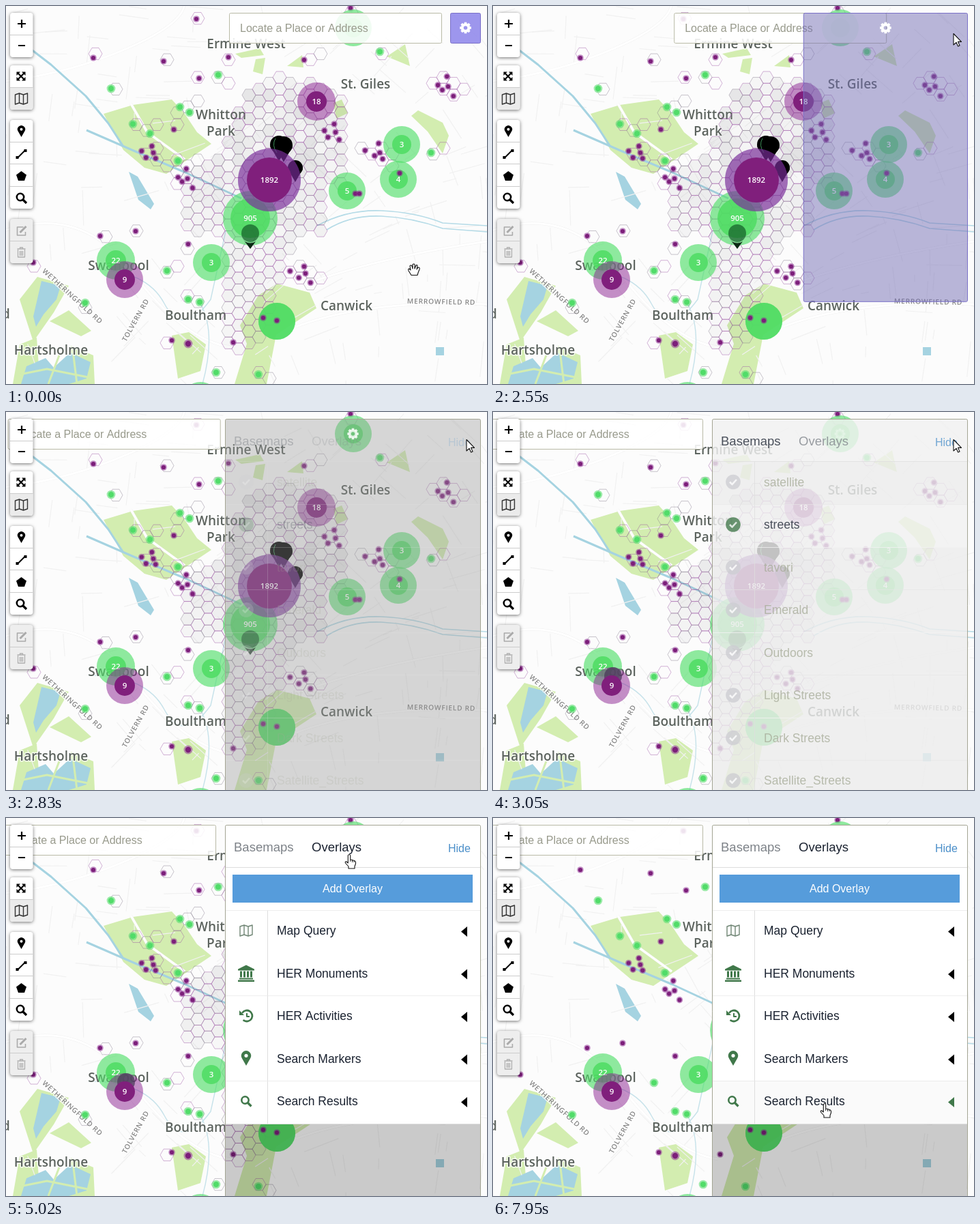
Animation of 705x554 px, one loop 8 s. Source, as an HTML page with a canvas:

```html
<!DOCTYPE html>
<html lang="en">
<head>
<meta charset="utf-8">
<title>Map overlays panel</title>
<style>
html, body { margin: 0; width: 100%; height: 100%; overflow: hidden; background: #fcfcfc; }
canvas { display: block; }
</style>
</head>
<body>
<canvas id="stage" width="705" height="554"></canvas>
<script>
const W = 705, H = 554, LOOP = 8000, TAU = Math.PI * 2;
const stage = document.getElementById('stage').getContext('2d');
const SANS = '"Liberation Sans", Arial, sans-serif';
const MAP = '"Open Sans", "Noto Sans", sans-serif';
const GREEN = '#40784a', INK = '#1a2230';
let g = stage;

const clamp = v => Math.max(0, Math.min(1, v));
const span = (t, a, b) => clamp((t - a) / (b - a));
const smooth = u => u * u * (3 - 2 * u);
const mix = (a, b, u) => a + (b - a) * u;

function layer(draw) {
  const c = document.createElement('canvas');
  c.width = W; c.height = H;
  g = c.getContext('2d');
  draw();
  g = stage;
  return c;
}
function fill(d, color) { g.fillStyle = color; g.fill(new Path2D(d)); }
function line(d, color, w = 1) {
  g.strokeStyle = color; g.lineWidth = w; g.lineJoin = 'round';
  g.stroke(new Path2D(d));
}
function disc(x, y, r, color) {
  g.fillStyle = color; g.beginPath(); g.arc(x, y, r, 0, TAU); g.fill();
}
function rect(x, y, w, h, color) { g.fillStyle = color; g.fillRect(x, y, w, h); }
function text(s, x, y, font, color, align = 'left') {
  g.font = font; g.fillStyle = color; g.textAlign = align;
  g.fillText(s, x, y);
}
function at(x, y, draw, angle = 0) {
  g.save(); g.translate(x, y); g.rotate(angle); draw(); g.restore();
}
function random(seed) {
  return () => (seed = (seed * 16807) % 2147483647) / 2147483647;
}

// ---- base map ----
function label(s, x, y, font, color, angle = 0) {
  at(x, y, () => {
    g.font = font; g.textAlign = 'center'; g.lineJoin = 'round';
    g.strokeStyle = 'rgba(255,255,255,.8)'; g.lineWidth = 3;
    g.strokeText(s, 0, 0);
    text(s, 0, 0, font, color, 'center');
  }, angle);
}
const place = (s, x, y) => label(s, x, y, '600 19px ' + MAP, '#5d645f');
function road(s, x, y, angle) {
  g.letterSpacing = '.7px';
  label(s, x, y, '600 10.3px ' + MAP, '#858585', angle);
  g.letterSpacing = '0px';
}
const base = layer(() => {
  rect(0, 0, W, H, '#fcfcfc');
  const park = '#d3edb0', water = '#a5d3e1';
  fill('M143 158 186 145 243 137 262 158 280 185 301 202 235 246 203 237 172 211Z', park);
  fill('M336 70 372 62 378 72 345 76ZM366 78 380 76 376 100 362 96ZM412 88 434 72 436 90ZM558 74 585 56 592 88Z', park);
  fill('M594 161 604 153 640 171 649 190 640 216 618 184ZM480 142 492 137 501 157 484 165Z', park);
  fill('M370 424 397 407 445 420 455 443 396 482 382 554 335 554 353 495 343 468Z', park);
  fill('M20 430 46 397 92 410 70 449 40 492ZM64 462 92 446 125 476 110 484ZM20 496 45 486 50 554 10 554ZM95 498 128 512 130 554 88 554Z', park);
  fill('M243 483 268 478 293 496 285 535 252 546Z', park);
  fill('M52 403 80 410 74 430 55 452 44 470 40 455ZM30 528 58 516 70 530 94 508 124 522 118 546 92 554 22 554Z', water);
  fill('M180 243 193 250 217 290 212 298 194 284ZM630 500H642V512H630Z', water);
  line('M20 540 60 532 125 545M78 512 62 554M98 505 104 554', park, 3);

  const rnd = random(71);
  g.strokeStyle = '#f1f1f1'; g.lineWidth = 1.2;
  for (let i = 0; i < 200; i++) {
    const x = rnd() * W, y = rnd() * H, len = 10 + rnd() * 45;
    const a = -.35 + Math.sin(x / 130 + y / 170) * .5 + (rnd() > .5 ? Math.PI / 2 : 0);
    g.beginPath(); g.moveTo(x, y);
    g.lineTo(x + len * Math.cos(a), y + len * Math.sin(a)); g.stroke();
  }
  const main = 'M0 110Q95 98 178 62T262 -5M183 143 207 185 262 225M-5 330Q110 290 185 390T330 500M455 402Q560 366 705 345M425 470Q530 430 705 437';
  line(main, '#f0f0f0', 4);
  line(main, '#ffffff', 3);
  line('M8 44 40 66 66 86 117 132 150 172 172 206', water, 3);
  line('M118 182 187 212 263 244 345 282', water, 3);
  line('M456 322Q500 298 550 300T640 318L705 322M470 328Q505 306 550 308T640 326L705 331', '#b5dbe7', 1.6);
  line('M120 386Q205 385 232 436T300 430L322 330M286 438Q308 480 288 554', '#c6e2ea', 1.4);

  place('Ermine West', 352, 62);
  place('Whitton', 315, 166);
  place('Park', 315, 190);
  place('St. Giles', 527, 121);
  place('Swanpool', 165, 387);
  place('Boultham', 278, 460);
  place('Canwick', 499, 446);
  place('Hartsholme', 66, 511);
  place('d', 0, 458);
  road('WETHERINGFOLD RD', 95, 428, .735);
  road('TOLVERN RD', 193, 462, -1.06);
  road('MERROWFIELD RD', 638, 437, .02);
});

// ---- hexagons and points ----
const pairs = (...v) => v.flatMap((x, i) => i % 2 ? [] : [[x, v[i + 1]]]);
const greens = pairs(154,121, 255,148, 269,156, 186,173, 211,187, 252,227, 311,101, 236,388, 116,435,
  267,430, 284,434, 308,537, 370,540, 548,67, 623,215);
const purples = pairs(279,19, 128,76, 231,81, 283,106, 326,75, 437,79, 246,181, 190,330, 138,337,
  267,349, 40,376, 243,490, 333,493, 505,3);
const clumps = pairs(213,215, 263,253, 480,185, 436,392, 645,118, 545,215);
const spread = random(44);
for (const [x, y] of clumps)
  for (let k = 0; k < 5; k++) {
    const a = k * 2.4, r = 3 + 11 * Math.sqrt(k / 4) * (.6 + spread());
    purples.push([x + r * Math.cos(a), y + r * Math.sin(a)]);
  }

const COL = 15, ROW = 17.3;
function centre(c, r) { return [131 + COL * c, 70 + ROW * (r + (c & 1) / 2)]; }
function cellAt([x, y]) {
  const near = [-1, 0, 1].map(d => {
    const c = Math.round((x - 131) / COL) + d, r = Math.round((y - 70) / ROW - (c & 1) / 2);
    const [cx, cy] = centre(c, r);
    return { cell: [c, r], gap: Math.hypot(cx - x, cy - y) };
  });
  return near.sort((a, b) => a.gap - b.gap)[0].cell;
}
const hexes = layer(() => {
  const town = new Path2D('M401 96 350 128 334 165 318 220 258 248V328L320 335V500L348 512 378 492 395 425 408 380 440 332 470 330 475 262 498 260V140L446 112Z');
  const cells = new Map(), rnd = random(929);
  for (let c = 8; c < 26; c++)
    for (let r = 0; r < 28; r++)
      if (g.isPointInPath(town, ...centre(c, r))) cells.set(c + ',' + r, [c, r, true]);
  for (const p of [...greens, ...purples]) {
    const [c, r] = cellAt(p);
    for (const d of rnd() > .6 ? [0, 1] : [0])
      if (!cells.has(c + d + ',' + r)) cells.set(c + d + ',' + r, [c + d, r]);
  }
  for (const [c, r, dense] of cells.values()) {
    const [x, y] = centre(c, r), d = Math.hypot(x - 400, (y - 200) * .8);
    const shade = dense ? .03 + .24 * rnd() * Math.exp(-d / 110) : 0;
    g.beginPath();
    for (let k = 0; k < 6; k++) g.lineTo(x + 10 * Math.cos(k * TAU / 6), y + 10 * Math.sin(k * TAU / 6));
    g.closePath();
    g.fillStyle = `rgba(110,110,115,${shade})`; g.fill();
    g.strokeStyle = rnd() > .35 ? 'rgba(150,75,160,.42)' : 'rgba(120,110,130,.4)';
    g.lineWidth = 1; g.stroke();
  }
});

function purpleDot(x, y, k = 1) {
  disc(x, y, 4.8 * k, 'rgba(140,40,145,.5)');
  disc(x, y, 3.1 * k, '#7c1f7a');
}
function cluster(x, y, outer, inner, count, purple) {
  disc(x, y, outer, purple ? 'rgba(140,35,145,.5)' : 'rgba(80,222,105,.64)');
  disc(x, y, inner, purple ? '#801f7c' : 'rgba(78,220,98,.85)');
  text(count, x, y + 4, '600 11.5px ' + MAP, '#fff', 'center');
}
function pin(x, y, r) {
  disc(x, y, r, '#000');
  fill(`M${x - r} ${y + 2}L${x} ${y + r * 1.9}L${x + r} ${y + 2}Z`, '#000');
}
const points = layer(() => {
  for (const [x, y] of greens) {
    disc(x, y, 6.3, 'rgba(90,222,112,.6)');
    disc(x, y, 4, '#51dc69');
  }
  for (const [x, y] of purples) purpleDot(x, y);
  purpleDot(267, 495, 1.35);
  cluster(580, 203, 27, 14, '3');
  cluster(575, 254, 27, 14, '4');
  purpleDot(577, 245);
  cluster(500, 271, 27, 14, '5');
  purpleDot(512, 275); purpleDot(518, 275);
  cluster(301, 376, 27, 14, '3');
  cluster(509, 32, 27, 14, '');
  cluster(397, 462, 27, 27, '');
  purpleDot(377, 457); purpleDot(397, 461);
  cluster(285, 578, 27, 14, '');
  cluster(161, 373, 28, 15, '22');
  pin(400, 203, 13);
  line('M395 194Q389 204 397 215', '#3d8c57');
  pin(407, 204, 13);
  pin(424, 237, 11);
  cluster(455, 140, 28, 15, '18', true);
  cluster(358, 311, 40, 29, '905');
  disc(358, 333, 13, 'rgba(10,75,30,.62)');
  fill('M350 345Q358 350 366 345L358 356Z', '#0d2a15');
  disc(386, 255, 46, 'rgba(70,75,180,.35)');
  cluster(386, 255, 46, 33, '1892', true);
});

// ---- controls ----
function gear(x, y) {
  at(x, y, () => {
    g.strokeStyle = '#fff'; g.lineWidth = 4;
    g.beginPath(); g.arc(0, 0, 4.8, 0, TAU); g.stroke();
    for (let k = 0; k < 8; k++) {
      const a = k * TAU / 8, c = Math.cos(a), s = Math.sin(a);
      g.lineWidth = 3.6; g.beginPath(); g.moveTo(c * 5, s * 5); g.lineTo(c * 8.3, s * 8.3); g.stroke();
    }
  });
}
function magnifier(color) {
  g.strokeStyle = color; g.lineWidth = 2.6;
  g.beginPath(); g.arc(-1.5, -1.5, 5.2, 0, TAU); g.stroke();
  line('M2.5 2.5 7.5 7.5', color, 3.2);
}
function mapIcon(color) {
  line('M-9 -6 -3 -8 3 -6 9 -8V6L3 8 -3 6 -9 8ZM-3 -8V6M3 -6V8', color, 1.4);
}
function marker(color, k = 1) {
  g.scale(k, k);
  g.fillStyle = color;
  g.fill(new Path2D('M0 8L-4.6 0A5.6 5.6 0 1 1 4.6 0ZM2 -3.2A2 2 0 1 0 -2 -3.2A2 2 0 1 0 2 -3.2Z'), 'evenodd');
}
function group(y, cells, color = '#fff') {
  g.save();
  g.shadowColor = 'rgba(0,0,0,.55)'; g.shadowBlur = 5; g.shadowOffsetY = 1;
  g.fillStyle = color; g.beginPath(); g.roundRect(6, y, 33.5, cells * 32.5, 4); g.fill();
  g.restore();
  for (let i = 1; i < cells; i++) rect(6, Math.round(y + i * 32.5) - 1, 33.5, 1, '#ccc');
}
const tools = layer(() => {
  group(10, 2); group(87, 2); group(167, 4); group(312, 2, '#eeeeee');
  fill('M6 120H39.5V148Q39.5 152 35.5 152H10Q6 152 6 148Z', '#ebebeb');
  line('M17 26H29M23 20V32M18 58H28', '#000', 2.2);
  at(22, 103, () => {
    line('M-4 -4 4 4M4 -4 -4 4', '#000', 2.2);
    for (let k = 0; k < 4; k++) {
      g.rotate(TAU / 4);
      fill('M-6.5 -6.5H-1L-6.5 -1Z', '#000');
    }
  });
  at(22.5, 136, () => mapIcon('#333'));
  at(22.5, 184, () => marker('#000'));
  at(22.5, 217, () => {
    line('M-5 5 5 -5', '#000', 2);
    rect(-8, 3, 4, 4, '#000'); rect(4, -7, 4, 4, '#000');
  });
  fill('M22.5 242 30 247.5 27 256H18L15 247.5Z', '#000');
  at(22.5, 281.5, () => magnifier('#000'));
  at(22.5, 329, () => {
    line('M3 -5H-6V7H6V2', '#aaa', 1.6);
    line('M-2 3 7 -6', '#aaa', 3);
  });
  at(22.5, 361, () => line('M-6 -5H6M-2 -5V-7H2V-5M-5 -4V7H5V-4M-2 -2V5M0 -2V5M2 -2V5', '#b0b0b0', 1.3));
});

function searchBox(x) {
  g.beginPath(); g.roundRect(x + .5, 10.5, 311, 44, 2);
  g.fillStyle = 'rgba(255,255,255,.88)'; g.fill();
  g.strokeStyle = '#b9baa6'; g.lineWidth = 1; g.stroke();
  text('Locate a Place or Address', x + 16, 38, '16px ' + SANS, '#989a8c');
}

const overlayIcons = [
  () => mapIcon('#6f8574'),
  () => {
    fill('M0 -12 12 -6V-4H-12V-6ZM-10 7H10V9H-10ZM-12 10H12V12.5H-12Z', GREEN);
    for (let k = 0; k < 4; k++) rect(-9 + 5 * k, -3, 3, 9, GREEN);
  },
  () => {
    g.strokeStyle = GREEN; g.lineWidth = 2.8;
    g.beginPath(); g.arc(1, 0, 8, -2.6, 2.3); g.stroke();
    fill('M-10 -8V-1H-3Z', GREEN);
    line('M1 -4V1H5', GREEN, 2);
  },
  () => marker(GREEN, 1.3),
  () => magnifier(GREEN)
];
const basemaps = ['satellite', 'streets', 'tavori', 'Emerald', 'Outdoors', 'Light Streets', 'Dark Streets', 'Satellite_Streets'];
const overlays = ['Map Query', 'HER Monuments', 'HER Activities', 'Search Markers', 'Search Results'];
const PITCH = 62.5;

function row(i, name, bg, color, icon) {
  const y = 73 + PITCH * i;
  rect(322, y, 373, PITCH, bg);
  rect(322, Math.round(y + 62), 373, 1, '#dedede');
  rect(383, y, 1, PITCH, '#dedede');
  text(name, 397, y + 35.5, '17.5px ' + SANS, color);
  at(352, y + 29.5, icon);
}
function content(tab, hover, y) {
  rect(322, 11, 373, 62, '#fff');
  rect(322, 72, 373, 1, '#dedede');
  text('Basemaps', 334, 49, '18.55px ' + SANS, tab ? '#7d8288' : INK);
  text('Overlays', 448, 49, '18.55px ' + SANS, tab || hover ? INK : '#7d8288');
  text('Hide', 648, 50, '16px ' + SANS, '#4b8fc9');
  if (!tab) {
    basemaps.forEach((name, i) => {
      const on = name === 'streets';
      row(i, name, on ? '#fff' : '#fafafa', on ? INK : '#a6ab98', () => {
        disc(0, 0, 10.8, on ? GREEN : '#cdcdd2');
        line('M-5 0 -1.5 3.7 5 -3.5', '#fff', 2.6);
      });
    });
    return;
  }
  rect(322, 73, 373, 62, '#fff');
  rect(332, 83, 352, 41, '#569cdb');
  rect(322, 135, 373, 1, '#dedede');
  text('Add Overlay', 508, 109, '16px ' + SANS, '#fff', 'center');
  overlays.forEach((name, i) => {
    const top = 73 + PITCH * (i + 1), over = y >= top && y < top + PITCH;
    row(i + 1, name, over ? '#fafafa' : '#fff', INK, overlayIcons[i]);
    fill(`M667 ${top + 31}l9 -7.5v15Z`, over ? GREEN : '#000');
  });
}
// premultiplied blend from the violet button to a light shade
function tint(p) {
  const a = mix(.93, .2, p), k = .93 * (1 - p) / a;
  return `rgba(${150 * k},${142 * k},${236 * k},${a})`;
}
function panel(t, y, hover) {
  const p = 1 - (1 - span(t, 2442, 2742)) ** 2;
  const w = mix(45, 375, p), h = mix(45, 682, p), x = 696 - w;
  const frame = new Path2D();
  frame.roundRect(x + .5, 10.5, w - 1, h - 1, 2);
  g.fillStyle = tint(p); g.fill(frame);
  const show = span(t, 2742, 3140);
  g.globalAlpha = 1 - show;
  gear(x + w / 2, 32);
  g.globalAlpha = show;
  if (show) content(t >= 5020, hover, y);
  g.globalAlpha = 1;
  g.strokeStyle = p < 1 ? '#7a70c8' : '#a4a594'; g.lineWidth = 1; g.stroke(frame);
}

// ---- cursor ----
const shapes = {
  grab: 'M-4 8.5L-8 2Q-9 -1 -7 -1L-5 1 -6 -5Q-5 -7 -3 -5L-2 -1 -2 -7Q0 -9 1 -7L1 -1 3 -6Q5 -7 5 -5L4 0 6 -3Q9 -3 8 0L6 5 5 8.5Z',
  point: 'M-1.7 1.8Q0 -.8 1.7 1.8V8L4.5 8.5 8.5 10Q10 11 9.5 14L8 18V21H-1V18L-5.5 13Q-6.5 10.5 -4 11L-1.7 13Z',
  arrow: 'M0 .5V17L4 13.3 6.6 19 9 18 6.5 12.4H11.5Z'
};
// each move: start, end, target x, y
const moves = [
  [390, 1180, 682, 184], [1200, 1840, 676, 43], [2239, 2240, 675, 40], [3340, 4160, 503, 53],
  [6130, 6830, 541, 326], [6830, 6920, 535, 361], [6960, 7210, 486, 418]
];
function cursorAt(t) {
  let x = 598, y = 386;
  for (const [from, to, tx, ty] of moves) {
    const u = smooth(span(t, from, to)), sag = .07 * Math.abs(tx - x) * Math.sin(Math.PI * u);
    x = mix(x, tx, u);
    y = mix(y, ty, u) + sag;
    if (t < to) break;
  }
  let kind = 'point';
  if (t < 2240) kind = y < 55 ? 'point' : 'grab';
  else if (t < 4160 && x > 522) kind = 'arrow';
  return { x, y, kind };
}

function draw(t) {
  const cur = cursorAt(t);
  g.drawImage(base, 0, 0);
  g.globalAlpha = 1 - span(t, 7720, 7940);
  g.drawImage(hexes, 0, 0);
  g.globalAlpha = 1;
  g.drawImage(points, 0, 0);
  if (t > 2900 && t < 7740) disc(176, 387, 13, 'rgba(12,80,35,.75)');
  cluster(174, 401, 27, 15, '9', true);
  searchBox(mix(327, -4, smooth(span(t, 2430, 2868))));
  panel(t, cur.y, t > 3340 && cur.kind === 'point');
  g.drawImage(tools, 0, 0);
  at(cur.x, cur.y, () => {
    fill(shapes[cur.kind], '#fff');
    line(shapes[cur.kind], '#111', 1.1);
    if (cur.kind === 'point') line('M1.7 8V11M4.5 9V12M7 10V12', '#111', .9);
  });
}

const begin = performance.now();
function tick() {
  draw((performance.now() - begin) % LOOP);
  requestAnimationFrame(tick);
}
tick();
</script>
</body>
</html>
```
